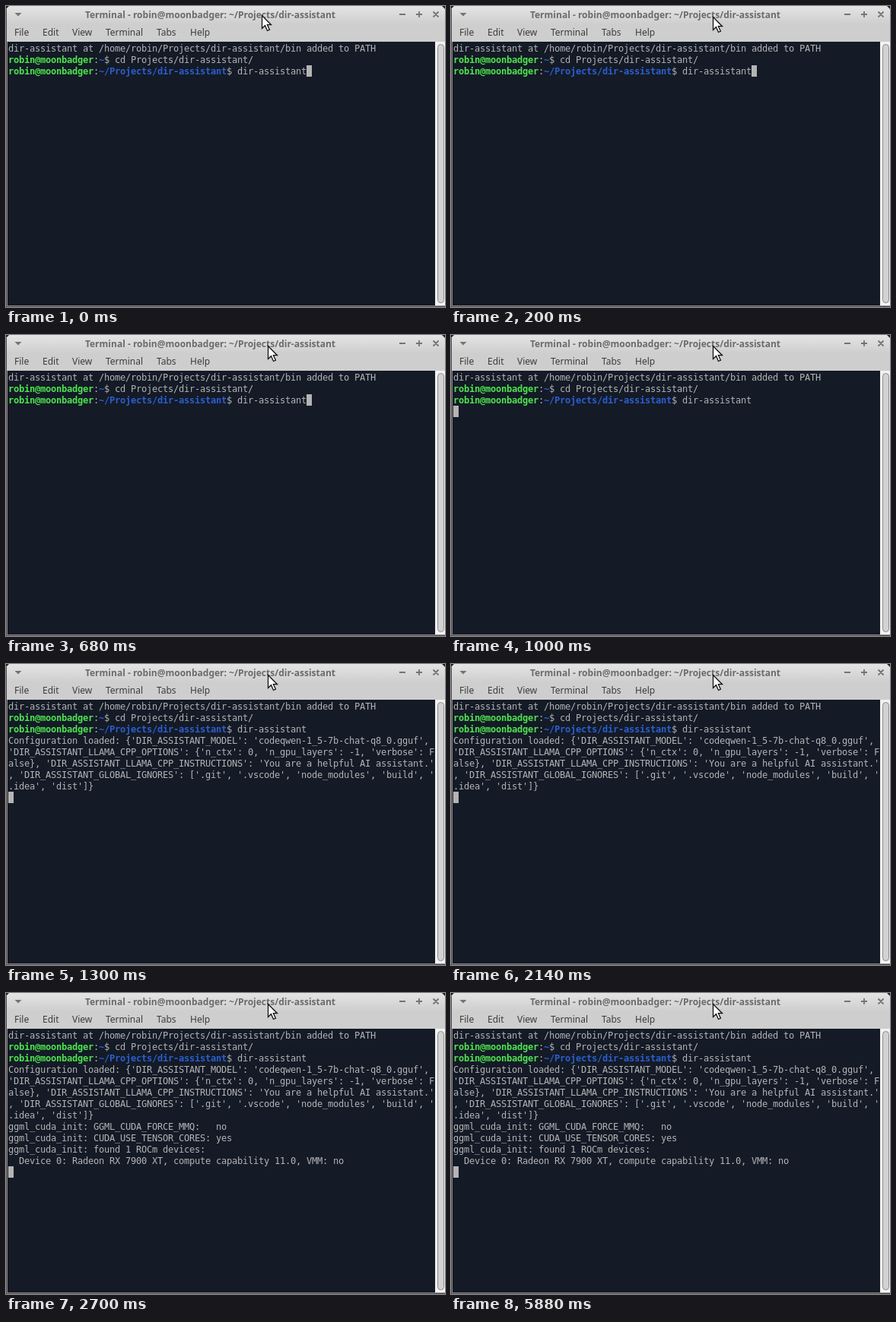
Animation of 577 by 396 pixels, one loop 8 s. Source, as an HTML page:

```html
<!DOCTYPE html>
<html lang="en">
<head>
<meta charset="utf-8">
<title>Terminal</title>
<style>
  html, body { margin: 0; width: 100%; height: 100%; overflow: hidden; }
  body { position: relative; background: #cecece; }
  svg { position: absolute; left: 0; top: 0; }
  svg text { font: 12px "Noto Sans", "Open Sans", sans-serif; fill: #3c3c3c; }
  svg .title { font-weight: bold; fill: #6b6b6b; text-anchor: middle; }
  pre {
    position: absolute; left: 3px; top: 49px; margin: 0;
    font: 12px/15px "DejaVu Sans Mono", monospace;
    letter-spacing: calc(7px - 1ch); /* terminal cells are 7px wide */
    color: #b4b4b4;
  }
  pre b { color: #4ee44e; }
  pre b.path { color: #2b5fcf; }
  #caret { position: absolute; width: 7px; height: 15px; background: #b4b4b4; }
</style>
</head>
<body>
<svg width="577" height="396" viewBox="0 0 577 396">
  <defs>
    <linearGradient id="bar" x2="0" y2="1">
      <stop stop-color="#e4e4e4"/><stop offset="1" stop-color="#cecece"/>
    </linearGradient>
  </defs>
  <rect width="577" height="24" fill="url(#bar)"/>
  <path d="M0 0H4L0 4ZM577 0H573L577 4Z" fill="#2b2024"/>
  <path d="M11.5 9h9l-4.500 4.500z" fill="#747474"/>
  <path d="M517 11h8M539 11h8M543 7v8M561.500 7.500l7 7M568.500 7.500l-7 7" stroke="#747474" stroke-width="1.800"/>
  <text class="title" x="268.5" y="16">Terminal - robin@moonbadger: ~/Projects/dir-assistant</text>
  <g id="menu"></g>
  <rect x="2" y="47" width="562" height="347" fill="#141a26"/>
  <rect x="564" y="47" width="13" height="347" fill="#f2f2f2"/>
  <rect x="567.5" y="50.500" width="8" height="340" rx="4" fill="#d2d2d2" stroke="#8c8c8c"/>
  <path d="M1.500 47V394.500H577" fill="none" stroke="#8c8c8c"/>
  <path d="M.5 4V396M0 395.500H577" stroke="#55494d"/>
</svg>
<pre id="screen"></pre>
<div id="caret"></div>
<svg width="577" height="396" viewBox="0 0 577 396">
  <path id="pointer" d="M.5 .5V17.500l4-3.800 3 6.800 2.900-1.300-3-6.500H12.500Z" fill="#fff" stroke="#111" stroke-width="1.300"/>
</svg>
<script>
const DURATION = 8000;
const $ = id => document.getElementById(id);

const menu = [['File', 11], ['Edit', 48], ['View', 87], ['Terminal', 131], ['Tabs', 198], ['Help', 242]];
$('menu').innerHTML = menu.map(([label, x]) => `<text x="${x}" y="39">${label}</text>`).join('');

const prompt = path => `<b>robin@moonbadger</b>:<b class="path">${path}</b>$ `;
const shell = `dir-assistant at /home/robin/Projects/dir-assistant/bin added to PATH
${prompt('~')}cd Projects/dir-assistant/
${prompt('~/Projects/dir-assistant')}dir-assistant`;
const config = `
Configuration loaded: {'DIR_ASSISTANT_MODEL': 'codeqwen-1_5-7b-chat-q8_0.gguf',
'DIR_ASSISTANT_LLAMA_CPP_OPTIONS': {'n_ctx': 0, 'n_gpu_layers': -1, 'verbose': F
alse}, 'DIR_ASSISTANT_LLAMA_CPP_INSTRUCTIONS': 'You are a helpful AI assistant.'
, 'DIR_ASSISTANT_GLOBAL_IGNORES': ['.git', '.vscode', 'node_modules', 'build', '
.idea', 'dist']}`;
const devices = `
ggml_cuda_init: GGML_CUDA_FORCE_MMQ:   no
ggml_cuda_init: CUDA_USE_TENSOR_CORES: yes
ggml_cuda_init: found 1 ROCm devices:
  Device 0: Radeon RX 7900 XT, compute capability 11.0, VMM: no`;

// Each state: start time, screen text, caret column and row
const states = [
  [0, shell, 56, 2],
  [1000, shell, 0, 3],
  [1300, shell + config, 0, 8],
  [2700, shell + config + devices, 0, 12],
];
let shown;

function draw(now) {
  const t = now % DURATION;
  const state = states.findLast(([start]) => t >= start);
  if (state !== shown) {
    const [, text, col, row] = shown = state;
    $('screen').innerHTML = text;
    $('caret').style.left = 3 + 7 * col + 'px';
    $('caret').style.top = 48 + 15 * row + 'px';
  }
  $('pointer').setAttribute('transform', t < 200 ? 'translate(336 12)' : 'translate(344 14)');
  requestAnimationFrame(draw);
}
draw(performance.now());
</script>
</body>
</html>
```
